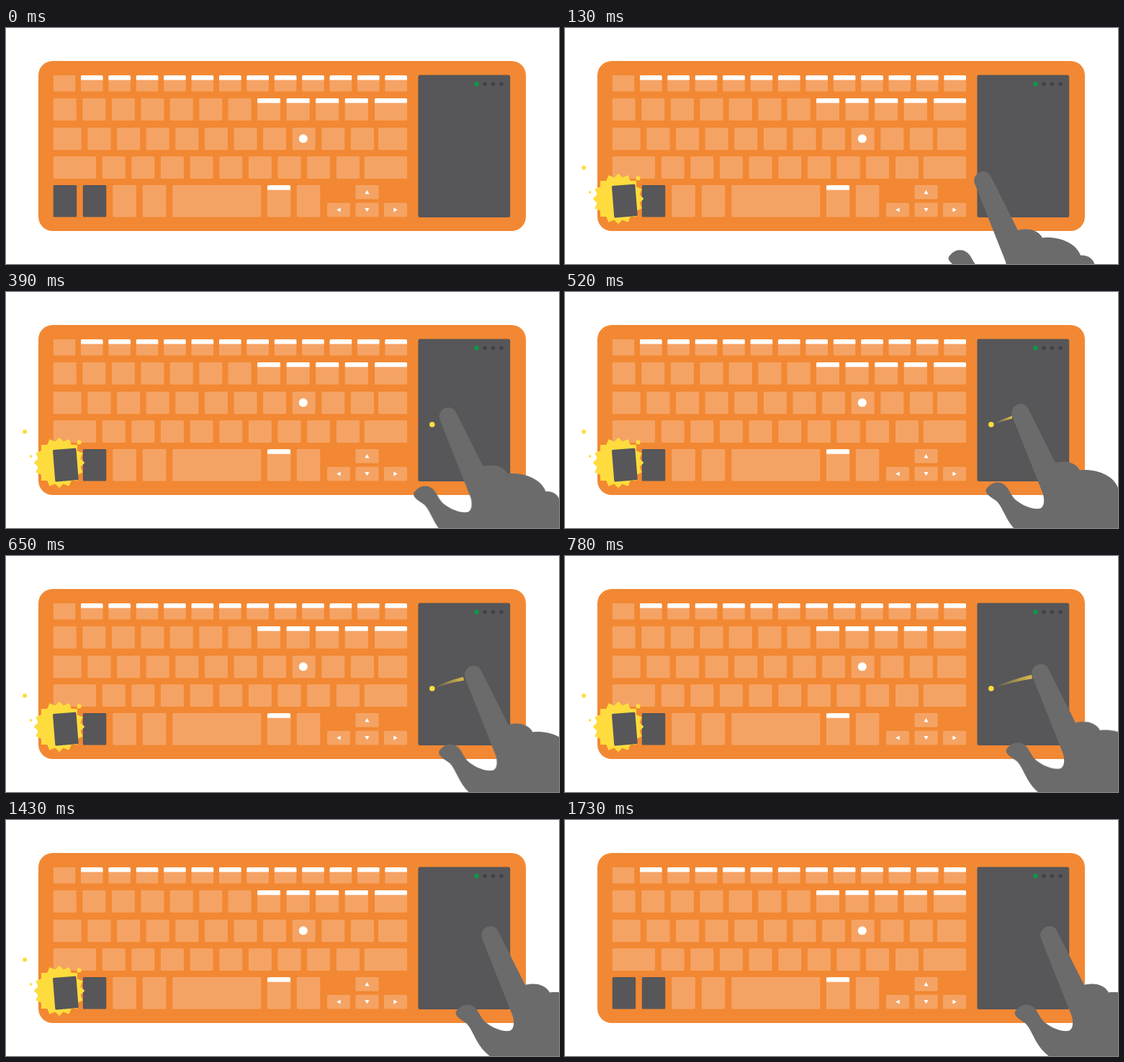
An HTML page without scripts for the animation above (2730 ms loop, 768x329 px).

```html
<!DOCTYPE html>
<html lang="en">
<head>
<meta charset="utf-8">
<title>Keyboard and touchpad</title>
<style>
  html, body { margin: 0; width: 100%; height: 100%; overflow: hidden; background: #fff; }
  svg { display: block; width: 100vw; height: 100vh; }

  .key { fill: #f5a364; }
  .dark { fill: #575659; }
  .sun { fill: #ffdc3d; }
  .hand { fill: #6b6b6c; }
  .white { fill: #fff; }

  .hand, .press, .rest, .dot { animation: 2730ms step-end infinite; }
  .hand { animation-name: swipe; }
  .press { animation-name: press; }
  .rest { animation-name: rest; }
  .dot { animation-name: dot; }

  /* one 130 ms slot per trail shape, chosen by --n */
  .trail path {
    fill: url(#fade);
    visibility: hidden;
    animation: slot 2730ms step-end calc(var(--n) * 130ms - 2730ms) infinite;
  }

  @keyframes slot { 0% { visibility: visible } 4.762%, 100% { visibility: hidden } }
  @keyframes press { 0% { visibility: hidden } 4.762% { visibility: visible } 63.37%, 100% { visibility: hidden } }
  @keyframes rest { 0% { visibility: visible } 4.762% { visibility: hidden } 63.37%, 100% { visibility: visible } }
  @keyframes dot { 0% { visibility: hidden } 14.286% { visibility: visible } 33.333%, 100% { visibility: hidden } }
  @keyframes swipe {
    0% { visibility: hidden; transform: translate(-14px, 26px) }
    4.762% { visibility: visible; transform: translate(-14px, 26px) }
    9.524% { visibility: visible; transform: none }
    14.286% { transform: translate(19.5px, -13px) }
    19.048% { transform: translate(38px, -18px) }
    23.81% { transform: translate(54.5px, -21px) }
    28.571% { transform: translate(66px, -23.5px) }
    33.333% { transform: translate(74px, -25px) }
    38.095%, 100% { visibility: visible; transform: translate(78px, -26px) }
  }
</style>
</head>
<body>
<svg viewBox="0 0 768 329" preserveAspectRatio="none">
  <defs>
    <linearGradient id="fade">
      <stop offset="0" stop-color="#ffdc3d" stop-opacity="0"/>
      <stop offset="1" stop-color="#f0cb4a" stop-opacity=".85"/>
    </linearGradient>

    <rect id="k" class="key" width="32" height="31" rx="1.5"/>
    <g id="k2"><use href="#k"/><use href="#k" x="40.6"/></g>
    <g id="k4"><use href="#k2"/><use href="#k2" x="81.2"/></g>

    <path id="cap" class="white" d="M0 6.5V1.5Q0 0 1.5 0H30.5Q32 0 32 1.5V6.5Z"/>
    <g id="c"><use href="#k"/><use href="#cap"/></g>
    <g id="c2"><use href="#c"/><use href="#c" x="40.6"/></g>

    <g id="f">
      <rect class="key" width="30.5" height="22.5" rx="1.5"/>
      <use href="#cap" transform="scale(.955 1)"/>
    </g>
    <g id="f2"><use href="#f"/><use href="#f" x="38.4"/></g>
    <g id="f4"><use href="#f2"/><use href="#f2" x="76.8"/></g>

    <rect id="tall" width="32.5" height="44.5" rx="1.5"/>
    <g id="arrow">
      <rect class="key" x="-16" y="-9.7" width="32" height="19.4" rx="1.5"/>
    </g>
    <path id="tip" class="white" d="M-3 2.6 0-2.8 3 2.6Z"/>
    <rect id="ray" x="-25" y="-25" width="50" height="50"/>
  </defs>

  <rect x="45" y="46" width="677" height="237" rx="20" fill="#f28833"/>

  <!-- function row -->
  <rect class="key" x="65.8" y="66" width="30.5" height="22.5" rx="1.5"/>
  <use href="#f4" x="104" y="66"/>
  <use href="#f4" x="257.6" y="66"/>
  <use href="#f4" x="411.2" y="66"/>

  <!-- letter rows -->
  <use href="#k4" x="65.7" y="98"/>
  <use href="#k2" x="227.7" y="98"/>
  <use href="#k" x="308.6" y="98"/>
  <use href="#c2" x="349" y="98"/>
  <use href="#c2" x="430.2" y="98"/>
  <rect class="key" x="512" y="98" width="45" height="31" rx="1.5"/>
  <use href="#cap" transform="translate(512 98) scale(1.406 1)"/>

  <rect class="key" x="65.7" y="139" width="39" height="31" rx="1.5"/>
  <use href="#k4" x="113.5" y="139"/>
  <use href="#k4" x="275.9" y="139"/>
  <use href="#k2" x="438.3" y="139"/>
  <rect class="key" x="517" y="139" width="40" height="31" rx="1.5"/>
  <circle class="white" cx="412.8" cy="154.3" r="6"/>

  <rect class="key" x="65.7" y="179" width="59.3" height="31" rx="1.5"/>
  <use href="#k4" x="133.7" y="179"/>
  <use href="#k4" x="296.3" y="179"/>
  <use href="#k" x="459" y="179"/>
  <rect class="key" x="497.7" y="179" width="59.3" height="31" rx="1.5"/>

  <!-- bottom row -->
  <use class="dark rest" href="#tall" x="65.7" y="219"/>
  <use class="dark" href="#tall" x="106.8" y="219"/>
  <use class="key" href="#tall" x="148.3" y="219"/>
  <use class="key" href="#tall" x="189.8" y="219"/>
  <rect class="key" x="231.3" y="219" width="123" height="44.5" rx="1.5"/>
  <use class="key" href="#tall" x="362.8" y="219"/>
  <use href="#cap" x="363" y="219.3"/>
  <use class="key" href="#tall" x="403.8" y="219"/>

  <g transform="translate(501.5 228.8)"><use href="#arrow"/><use href="#tip"/></g>
  <g transform="translate(501.5 253.5)"><use href="#arrow"/><use href="#tip" transform="rotate(180)"/></g>
  <g transform="translate(462 253.5)"><use href="#arrow"/><use href="#tip" transform="rotate(-90)"/></g>
  <g transform="translate(541 253.5)"><use href="#arrow"/><use href="#tip" transform="rotate(90)"/></g>

  <!-- touchpad -->
  <rect class="dark" x="572.4" y="65.5" width="127.8" height="198.5" rx="2.5"/>
  <circle cx="653.5" cy="78.2" r="3.3" fill="#0f9549"/>
  <g fill="#424145">
    <circle cx="665" cy="78.2" r="2.8"/>
    <circle cx="676.5" cy="78.2" r="2.8"/>
    <circle cx="688" cy="78.2" r="2.8"/>
  </g>

  <!-- pressed key with burst -->
  <g class="press">
    <g class="sun">
      <g transform="translate(74 238)">
        <use href="#ray"/>
        <use href="#ray" transform="rotate(22.5)"/>
        <use href="#ray" transform="rotate(45)"/>
        <use href="#ray" transform="rotate(67.5)"/>
      </g>
      <circle cx="26" cy="194.8" r="3"/>
      <circle cx="34.7" cy="229" r="1.8"/>
      <circle cx="101.6" cy="209.5" r="3.1"/>
    </g>
    <use class="dark" href="#tall" transform="translate(82.8 241) rotate(-4.5) translate(-16.2 -22.2)"/>
  </g>

  <!-- swipe trail -->
  <g class="trail">
    <path style="--n:4" d="M594 184.5Q607 177 621 172.5V176.5Q607 180 594 184.5Z"/>
    <path style="--n:5" d="M592 185Q612 174 635 168.5L636 173.5Q614 177 592 185Z"/>
    <path style="--n:6" d="M594 184Q620 172 648 165.5L649 171Q620 176 594 184Z"/>
    <path style="--n:7" d="M598 183Q625 170 656 163.5L657 169.3Q626 175 598 183Z"/>
    <path style="--n:8" d="M600 182Q627 169.500 657 163L658.500 169Q627 174.500 600 182Z"/>
    <path style="--n:9" d="M630 173.500L657 163L658.500 169Z"/>
    <path style="--n:10" d="M650 168L657 163L658.500 169Z"/>
  </g>
  <circle class="sun dot" cx="591.8" cy="184.8" r="3.8"/>

  <path class="hand" d="M583 191
    C578 176 599 167 605.500 181
    L643 256 C655 253 670 254 677 266.500
    C700 264 724 274 730 291
    C740 290 749 296 750 306
    Q755 316 755 329 V400 H620 V366
    Q598 361 588 350 C575 338 571 320 562 310
    C556 305 546 301 546.500 294
    C551 286 561 280 571 286
    C579 291 580 301 588 308
    C599 317 612 321 621 320
    C628 318 628 308 626 300 Z"/>
</svg>
</body>
</html>
```
